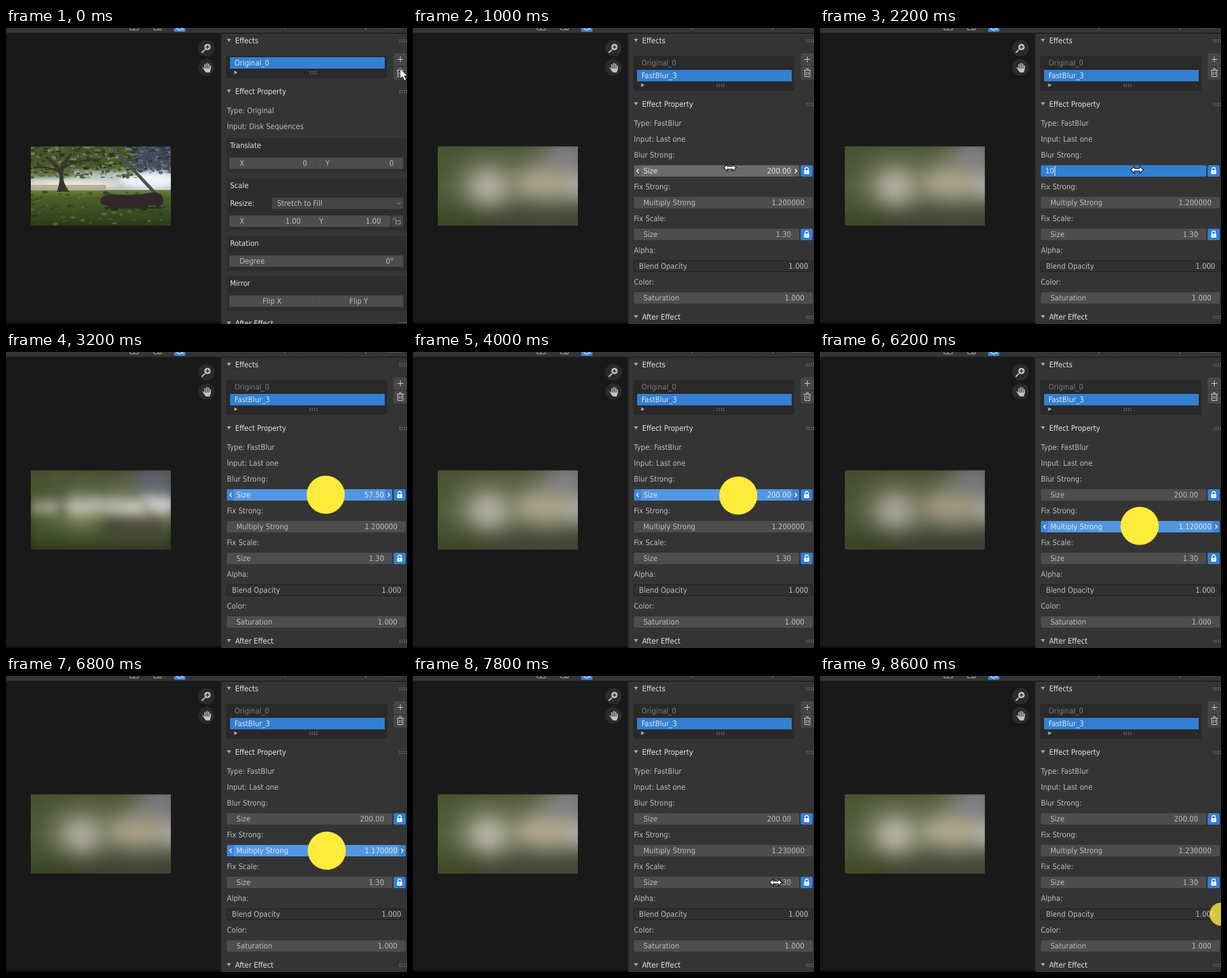
An HTML page for the animation above (8800 ms loop, 630 by 466 pixels).

```html
<!DOCTYPE html>
<html lang="en">
<head>
<meta charset="utf-8">
<title>Blur settings</title>
<style>
html, body { margin: 0; width: 100%; height: 100%; overflow: hidden; background: #191919; }
svg { display: block; width: 630px; height: 466px; }
text { font: 12px "DejaVu Sans Condensed", "Noto Sans", sans-serif; fill: #bcbcbc; white-space: pre; text-rendering: geometricPrecision; }
.hi { fill: #e4e4e4; }
.dim { fill: #7c7c7c; }
.end { text-anchor: end; }
.mid { text-anchor: middle; }
</style>
</head>
<body>
<svg viewBox="0 0 630 466">
  <defs>
    <clipPath id="frame"><rect x="39" y="186.500" width="220" height="124.500"/></clipPath>
    <linearGradient id="lawn" x2="0" y2="1">
      <stop stop-color="#70823f"/><stop offset=".2" stop-color="#4b6128"/><stop offset="1" stop-color="#2b3a1a"/>
    </linearGradient>
    <linearGradient id="base" x2="0" y2="1">
      <stop stop-color="#4a5333"/><stop offset=".5" stop-color="#666d52"/><stop offset="1" stop-color="#3b412d"/>
    </linearGradient>
  </defs>
  <rect width="630" height="466" fill="#191919"/>
  <g id="view"></g>
  <g clip-path="url(#frame)">
    <g id="photo"></g>
    <g id="haze"></g>
  </g>
  <rect x="338" width="292" height="466" fill="#343434"/>
  <rect x="337" width="2" height="466" fill="#262626"/>
  <g id="plain"></g>
  <g id="blur"></g>
  <g id="top"></g>
  <g id="arrow"><path d="M0 0v16l4-3.500 3 6.500 3-1.500-3-6h5z" fill="#fff" stroke="#111"/></g>
  <g id="resize"><path d="M-10 0l6-5.500v3.500h8v-3.500l6 5.500-6 5.500v-3.500h-8v3.500z" fill="#fff" stroke="#111" stroke-width="1.200"/></g>
  <circle id="press" fill="#ffeb3b"/>
</svg>
<script>
const LOOP = 8800, STEP = 200;
const $ = id => document.getElementById(id);
const rect = (x, y, w, h, fill, r = 0, more = '') =>
  `<rect x="${x}" y="${y}" width="${w}" height="${h}" rx="${r}" fill="${fill}" ${more}/>`;
const text = (x, y, s, cls = '') => `<text x="${x}" y="${y + 4}" class="${cls}">${s}</text>`;
const path = (d, fill = 'none', stroke = 'none', w = 1) =>
  `<path d="${d}" fill="${fill}" stroke="${stroke}" stroke-width="${w}"/>`;
const blob = (x, y, rx, ry, fill, more = '') =>
  `<ellipse cx="${x}" cy="${y}" rx="${rx}" ry="${ry}" fill="${fill}" ${more}/>`;
const field = (x, y, w, fill = '#4d4d4d') => rect(x, y - 9, w, 18, fill, 2);
const soften = (n, body) => `<g style="filter:blur(${n}px)">${body}</g>`;

function grip(x, y) {
  let s = '';
  for (let i = 0; i < 8; i++) s += rect(x + (i % 4) * 3.5, y + (i >> 2) * 3, 1.5, 1.5, '#7c7c7c');
  return s;
}
const header = (y, s) => path(`M347 ${y - 3}h6.500l-3.250 5z`, '#a8a8a8') + text(360, y, s, 'hi') + grip(618, y - 2);

function lock(y) {
  return rect(609, y - 9, 19, 18, '#3380d2', 2) + rect(614.5, y - 1, 8, 6, '#fff', 1) +
    path(`M616 ${y - 1}v-2a2.500 2.500 0 0 1 5 0v2`, 'none', '#fff', 1.3) + rect(618, y + 1, 1, 2, '#3380d2');
}

function list(names, h) {
  let s = rect(346, 44, 253, h, '#292929', 3);
  names.forEach((n, i) => {
    const on = i === names.length - 1, y = 55 + 20 * i;
    if (on) s += rect(352, y - 9, 243, 18, '#3380d2');
    s += text(359, y, n, on ? 'hi' : 'dim');
  });
  const y = 50 + 20 * names.length;
  return s + path(`M358.500 ${y - 3}l5.500 3-5.500 3z`, '#a8a8a8') + grip(477, y - 2);
}

function buttons() {
  return rect(609, 40, 21, 20, '#474747', 3) + rect(609, 61, 21, 20, '#474747', 3) +
    path('M615 49.500h9M619.500 45v9', 'none', '#ccc') +
    path('M614 66.500h11M618 66v-2h3v2M615.500 67v9.500h8v-9.500M618 69v5M621 69v5', 'none', '#c8c8c8');
}

// Seeded noise for the foliage
function noise(seed) {
  return () => (seed = (seed * 16807) % 2147483647) / 2147483647;
}

function drawPhoto() {
  const rnd = noise(77);
  const leaves = (n, x, y, w, h, colors) => {
    let s = '';
    for (let i = 0; i < n; i++) {
      const c = colors[Math.floor(rnd() * colors.length)];
      s += blob(x + rnd() * w, y + rnd() * h, 1 + rnd() * 4, .7 + rnd() * 1.8, c, 'opacity=".65"');
    }
    return s;
  };
  const scene = rect(39, 186, 220, 126, '#b9bfc0') +
    soften(5, blob(225, 240, 48, 13, '#f0f2fa') + blob(105, 246, 75, 7, '#ece9dc')) +
    soften(3, rect(30, 180, 190, 44, '#47542f') + rect(30, 218, 75, 16, '#59663c') +
      rect(205, 180, 60, 42, '#454e5c')) +
    leaves(360, 39, 186, 165, 50, ['#2b371b', '#4c5d2f', '#687a3d', '#1f2815', '#8f9c68']) +
    leaves(150, 190, 186, 69, 42, ['#252d37', '#3d4757', '#6d7b95', '#2c3630']) +
    rect(39, 255, 220, 57, 'url(#lawn)') +
    rect(39, 247, 118, 9, '#aaa384', 0, 'opacity=".75"') +
    leaves(130, 39, 257, 220, 54, ['#34461f', '#5c7536', '#27351a', '#435926']) +
    path('M80 258q7-20 2-34l-20-20 3-2 20 17 16-23 3 1-14 28q-3 17 10 33z', '#37352a') +
    path('M90 220q22-14 50-12M83 225q-20-8-40-5', 'none', '#373624', 3) +
    path('M166 187l74 79', 'none', '#4a4f50', 5) +
    path('M148 270q6-9 24-8 30 2 51-2 16-4 23 5l1 11-9 7-4-4-11 1-2 7h-8l-4-5-32 1-3 5h-8l-4-7-13-4z', '#30272a') +
    path('M155 283h90', 'none', '#263018', 3);
  return soften(.6, scene);
}

function drawHaze() {
  return rect(39, 186, 220, 126, 'url(#base)') +
    soften(18, blob(212, 240, 50, 38, '#8e8c78') + blob(245, 198, 34, 26, '#85818f') +
      blob(120, 248, 40, 34, '#989882') + blob(45, 245, 14, 70, '#435029') +
      blob(140, 196, 34, 12, '#4f5a38')) +
    soften(11, blob(210, 244, 46, 15, '#aea58a') + blob(257, 246, 16, 24, '#a9a7a3') +
      blob(118, 250, 21, 18, '#b0afa1')) +
    soften(12, blob(60, 310, 50, 14, '#3d4b24') + blob(205, 314, 85, 20, '#45463a'));
}

function drawView() {
  return blob(315, 32, 13, 13, '#2a2a2a') + blob(315, 62, 13, 13, '#2a2a2a') +
    '<circle cx="316.500" cy="30" r="5" fill="#c4c4c4"/>' +
    path('M312.500 34l-5 5', 'none', '#c4c4c4', 2) +
    path('M313.500 30h6M316.500 27v6', 'none', '#2a2a2a', 1.4) +
    path('M312.500 65v-8M315.500 64v-9M318.500 64v-8M321 65v-6', 'none', '#c4c4c4', 1.7) +
    path('M307.500 61l5 3h9.500l-2 6h-6z', '#c4c4c4');
}

function drawTop() {
  return rect(0, 0, 630, 8, '#353535') + rect(0, 7.5, 630, 1.5, '#1d1d1d') +
    text(6, -4, 'Render', 'dim') + text(352, -4, 'Active Tool', 'dim') + text(428, -4, 'Options', 'dim') +
    text(521, -4, 'View Layer', 'dim') + rect(596, 0, 26, 1, '#585858') +
    path('M195 0v3h13v-3M201 0v3M232 0v3h12v-3M238 0l4 3', 'none', '#b0b0b0') +
    rect(264, 0, 18, 6, '#4285d6', 2) + path('M268 0q3 5 8 2M276 0l3 3', 'none', '#e4e4e4', 1.2) +
    rect(0, 463.5, 338, 3, '#100d10');
}

function drawPlain() {
  const box = (y, h) => rect(347, y, 283, h, '#2d2d2d', 2);
  const split = y => rect(486.5, y - 9, 1, 18, '#464646');
  return header(20, 'Effects') + list(['Original_0'], 35) + buttons() + header(100, 'Effect Property') +
    text(347, 130, 'Type: Original') + text(347, 155, 'Input: Disk Sequences') +
    box(173, 54) + text(352, 185, 'Translate', 'hi') + field(351, 213, 273) + split(213) +
    text(367, 213, 'X') + text(473, 213, '0', 'end') + text(502, 213, 'Y') + text(609, 213, '0', 'end') +
    box(237, 81) + text(352, 248, 'Scale', 'hi') + text(352, 276, 'Resize:', 'hi') +
    field(418, 276, 206, '#444') + text(426, 276, 'Stretch to Fill') +
    path('M614 274.500l3 3 3-3', 'none', '#aaa') +
    field(351, 304, 253) + rect(477, 295, 1, 18, '#464646') + rect(605, 295, 19, 18, '#454545', 2) +
    text(367, 304, 'X') + text(463, 304, '1.00', 'end') + text(492, 304, 'Y') + text(589, 304, '1.00', 'end') +
    path('M612.500 303.500h7v5h-7zM612.500 303v-2q-2-3-4 0v2', 'none', '#999') +
    box(328, 54) + text(352, 339, 'Rotation', 'hi') + field(351, 367, 273) +
    text(367, 367, 'Degree') + text(609, 367, '0°', 'end') +
    box(391, 54) + text(352, 402, 'Mirror', 'hi') + field(351, 430, 273) + split(430) +
    text(418, 430, 'Flip X', 'mid') + text(554, 430, 'Flip Y', 'mid') + header(465, 'After Effect');
}

function slot(y, w, label, value, mode) {
  const right = 347 + w, fill = { hover: '#6b6b6b', drag: '#5297e2' }[mode];
  const cls = mode ? 'hi' : '';
  let s = field(347, y, w, fill);
  if (mode) {
    const end = mode === 'drag' ? '#3c83d2' : '#606060';
    s += rect(347, y - 9, 11, 18, end, 2) + rect(right - 11, y - 9, 11, 18, end, 2) +
      path(`M354.500 ${y - 3}l-3 3 3 3M${right - 7} ${y - 3}l3 3-3 3`, 'none', '#fff', 1.4);
  }
  return s + text(362, y, label, cls) + text(right - 13, y, value, cls + ' end');
}

function drawBlur(s) {
  const edit = s.edit === null ? slot(225, 260, 'Size', s.size.toFixed(2), s.sizeMode)
    : field(347, 225, 260, '#3380d2') + text(354, 225, s.edit, 'hi') +
      rect(354.5 + s.edit.length * 7, 217, 1, 16, '#fff');
  const label = (y, v) => text(347, y, v);
  return header(20, 'Effects') + list(['Original_0', 'FastBlur_3'], 55) + buttons() +
    header(120, 'Effect Property') + label(150, 'Type: FastBlur') + label(175, 'Input: Last one') +
    label(200, 'Blur Strong:') + edit + lock(225) +
    label(250, 'Fix Strong:') + slot(275, 281, 'Multiply Strong', s.strong.toFixed(6), s.strongMode) +
    label(300, 'Fix Scale:') + slot(325, 260, 'Size', '1.30') + lock(325) +
    label(350, 'Alpha:') + rect(346.5, 366.5, 282, 17, '#303030', 2, 'stroke="#202020"') +
    text(355, 375, 'Blend Opacity') + text(621, 375, '1.000', 'end') +
    label(400, 'Color:') + slot(425, 281, 'Saturation', '1.000') + header(455, 'After Effect');
}

// Each track is a list of [time, ...values]
function track(keys, t) {
  const i = Math.max(1, keys.findIndex(k => k[0] >= t));
  const a = keys[i - 1], b = keys[i];
  const p = Math.min(1, Math.max(0, (t - a[0]) / (b[0] - a[0])));
  return a.slice(1).map((v, n) => v + (b[n + 1] - v) * p);
}
const MOUSE = [[0, 619, 64], [200, 620, 53], [400, 620, 50], [1000, 498, 220], [1400, 498, 222],
  [2800, 498, 224], [4000, 511, 226], [4400, 509, 228], [5400, 502, 270], [5800, 501, 273],
  [6800, 504, 275], [7400, 510, 275], [8200, 630, 375], [LOOP, 630, 375]];
const SIZE = [[0, 200], [2400, 200], [2600, 10], [3000, 10], [3800, 200], [LOOP, 200]];
const STRONG = [[0, 1.2], [5800, 1.2], [6400, 1.08], [6800, 1.17], [7200, 1.23], [LOOP, 1.23]];
const PRESSES = [[400, 400], [1400, 1600], [2800, 4000], [5800, 7200], [8200, 8400]];

function draw(t) {
  const [x, y] = track(MOUSE, t), [size] = track(SIZE, t), [strong] = track(STRONG, t);
  const added = t >= 600;
  const hit = PRESSES.find(p => t >= p[0] && t < p[1] + 500);
  const held = hit && t <= hit[1];
  const over = cy => added && x < 607 && Math.abs(y - cy) < 9;
  const mode = cy => over(cy) ? (held ? 'drag' : 'hover') : '';
  const edit = t < 1800 || t >= 2600 ? null : t < 2000 ? '200' : t < 2200 ? '1' : '10';

  $('plain').innerHTML = added ? '' : drawPlain();
  $('blur').innerHTML = added ? drawBlur({ size, strong, edit, sizeMode: mode(225), strongMode: mode(275) }) : '';
  $('photo').style.filter = added ? `blur(${size / 8}px)` : 'none';
  $('haze').style.opacity = added ? Math.min(1, size / 120) : 0;
  $('haze').style.filter = `brightness(${strong / 1.2})`;

  const sizing = over(225) || over(275) || over(325);
  const show = (id, on) => {
    $(id).style.display = on ? '' : 'none';
    $(id).setAttribute('transform', `translate(${x} ${y})`);
  };
  show('arrow', !hit && !sizing);
  show('resize', !hit && sizing);
  show('press', hit);
  if (hit) {
    const age = Math.max(0, t - hit[1]) / 1000;
    $('press').setAttribute('r', Math.max(0, 30 - 60 * age));
    $('press').setAttribute('opacity', 1 - age);
  }
}

$('view').innerHTML = drawView();
$('photo').innerHTML = drawPhoto();
$('haze').innerHTML = drawHaze();
$('top').innerHTML = drawTop();

const start = performance.now();
let last = -1;
function tick() {
  const t = Math.floor(((performance.now() - start) % LOOP) / STEP) * STEP;
  if (t !== last) draw(last = t);
  requestAnimationFrame(tick);
}
tick();
</script>
</body>
</html>
```
